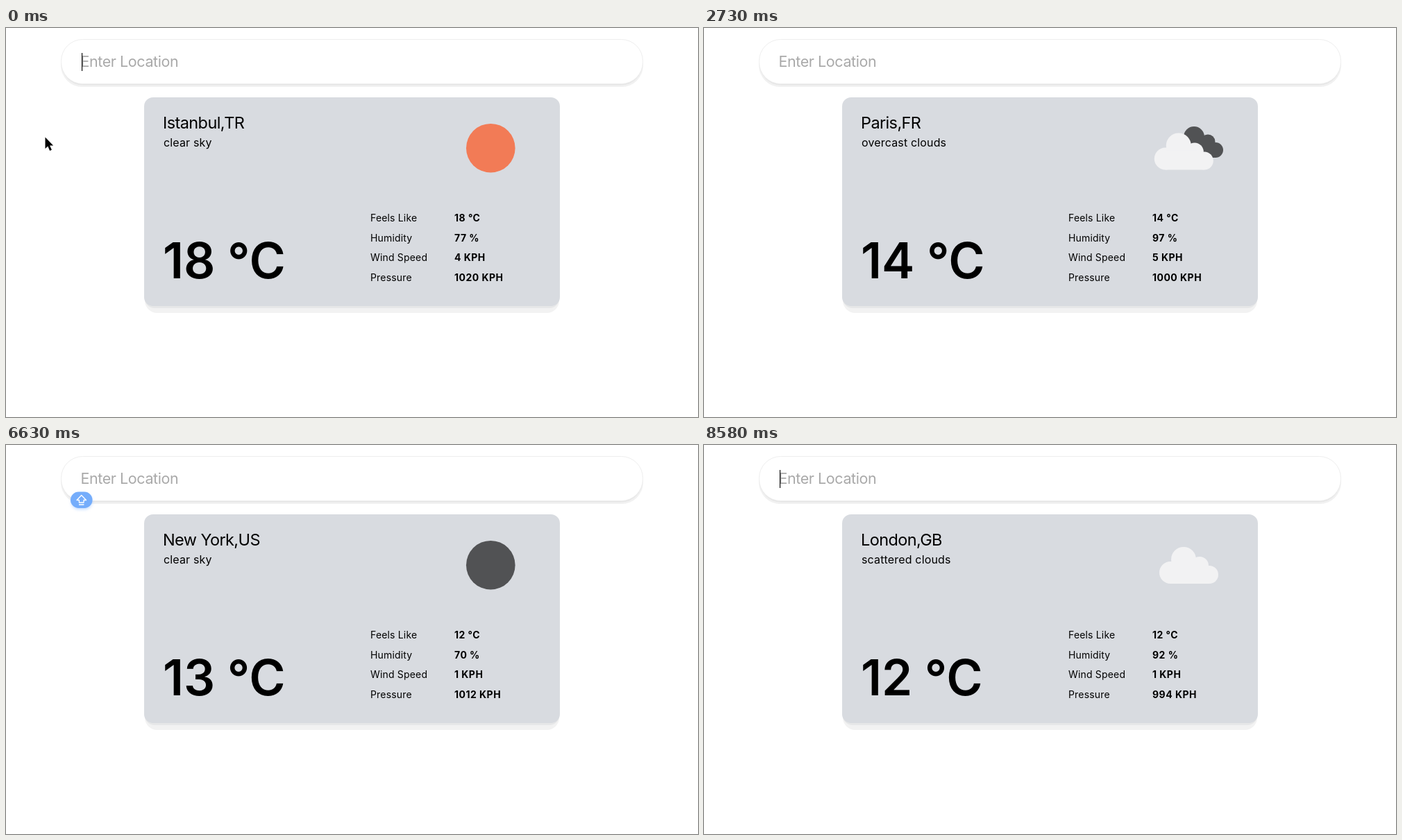
Animation of 997x561 px, one loop 8790 ms. Source, as an HTML page:

```html
<!DOCTYPE html>
<html lang="en">
<head>
<meta charset="utf-8">
<title>Weather</title>
<style>
html, body { margin: 0; width: 100%; height: 100%; overflow: hidden; background: #fff; }
svg { display: block; font-family: Inter, sans-serif; font-optical-sizing: none; }
text { white-space: pre; }
#field { font-size: 21.5px; letter-spacing: -.42px; }
#city { font-size: 23.5px; letter-spacing: -.6px; }
#sky { font-size: 16px; letter-spacing: .16px; }
#temp { font-size: 71px; font-weight: 600; letter-spacing: -.1px; }
.row { font-size: 14px; letter-spacing: .17px; }
.value { font-weight: 700; letter-spacing: .48px; }
</style>
</head>
<body>
<svg width="997" height="561" viewBox="0 0 997 561">
  <defs>
    <g id="cloud">
      <circle cx="672" cy="184" r="16"/><circle cx="691" cy="165" r="18"/>
      <circle cx="714" cy="174" r="13"/><circle cx="728" cy="187" r="13"/>
      <path d="M672 172H718L728 200H672Z"/>
    </g>
    <filter id="soft" x="-50%" y="-50%" width="200%" height="200%"><feGaussianBlur stdDeviation="2"/></filter>
  </defs>

  <rect x="79" y="20" width="839" height="65" rx="31" fill="#f1f1f1"/>
  <rect x="80" y="18" width="837" height="64.5" rx="31" fill="#e6e6e6"/>
  <rect x="79.5" y="16.5" width="838" height="64" rx="31" fill="#fff" stroke="#eee"/>

  <rect x="200" y="130" width="597" height="281" rx="18" fill="#f2f2f2"/>
  <rect x="200" y="130" width="597" height="274" rx="14" fill="#e6e7e8"/>
  <rect x="199" y="100" width="599" height="301" rx="13" fill="#d8dbe0"/>

  <text id="field" x="107.5" y="56.3"></text>
  <rect id="caret" y="36" width="1.1" height="26"/>

  <text id="city" x="226" y="145"></text>
  <text id="sky" x="227" y="171.3"></text>
  <text id="temp" x="226" y="361"></text>
  <g id="rows"></g>

  <circle id="disc" cx="698.3" cy="173.2" r="35.3"/>
  <g id="overcast">
    <g fill="#515254">
      <circle cx="706" cy="157" r="15"/><circle cx="726" cy="164" r="10.5"/>
      <circle cx="737" cy="176" r="11"/><path d="M700 158H726L738 187H710Z"/>
    </g>
    <use href="#cloud" x="-7.2" y="4.5" fill="#f2f2f3"/>
  </g>
  <use id="scattered" href="#cloud" fill="#f2f2f3"/>

  <g id="badge">
    <rect x="94" y="70" width="30" height="23" rx="11" fill="#8fbcff" opacity=".5" filter="url(#soft)"/>
    <rect x="93" y="67.5" width="31.5" height="23.5" rx="11.7" fill="#75adfb"/>
    <path d="M108.7 72.5L115.5 79.5H112V83H105.4V79.5H102Z M105 86H112.4" fill="none" stroke="#fff" stroke-width="1.3" stroke-linejoin="round"/>
  </g>
  <path id="mouse" d="M0 0V16.5L3.8 13L6.6 19.4L9.4 18.2L6.6 12H11.6Z" stroke="#fff" stroke-width="1.2" paint-order="stroke"/>
</svg>
<script>
const LOOP = 8790;
const $ = id => document.getElementById(id);
const show = (id, on) => $(id).style.display = on ? "" : "none";
const within = (t, spans) => spans.some(([a, b]) => t >= a && t < b);

// feels like, humidity, wind speed, pressure
const reports = [
  { at: 0, city: "Istanbul,TR", sky: "clear sky", temp: 18, values: [18, 77, 4, 1020] },
  { at: 2700, city: "Paris,FR", sky: "overcast clouds", temp: 14, values: [14, 97, 5, 1000] },
  { at: 5250, city: "New York,US", sky: "clear sky", temp: 13, values: [12, 70, 1, 1012] },
  { at: 8160, city: "London,GB", sky: "scattered clouds", temp: 12, values: [12, 92, 1, 994] }
];
const icons = [[0, "sun"], [2700, "overcast"], [5250, "moon"], [8400, "scattered"]];
const entries = [
  { word: "Paris", keys: [1200, 1470, 1800, 2010, 2100], clear: 2310 },
  { word: "New York", keys: [...Array(8)].map((_, i) => 4080 + i * 270 / 7), clear: 5010 },
  { word: "London", keys: [6750, 7020, 7200, 7350, 7530, 7680], clear: 7950 }
];
const caretOn = [[0, 120], [570, 1020], [1200, 2460], [2910, 3360], [3810, 4530],
  [4980, 5430], [5880, 6330], [6750, 8130], [8580, LOOP]];
const badgeOn = [[1110, 1200], [6630, 6750]];

const units = ["°C", "%", "KPH", "KPH"];
$("rows").innerHTML = ["Feels Like", "Humidity", "Wind Speed", "Pressure"].map((label, i) => {
  const y = 278.8 + i * 28.8;
  return `<text class="row" x="525" y="${y}">${label}</text><text class="row value" x="646" y="${y}"></text>`;
}).join("");
const cells = document.querySelectorAll(".value");

function drawField(t) {
  const entry = entries.find(e => t >= e.keys[0] && t < e.clear);
  const typed = entry ? entry.word.slice(0, entry.keys.filter(k => t >= k).length) : "";
  const field = $("field");
  field.textContent = typed || "Enter Location";
  field.setAttribute("fill", typed ? "#555" : "#a9a9a9");
  $("caret").setAttribute("x", typed ? 108.5 + field.getComputedTextLength() : 109);
  show("caret", within(t, caretOn));
  show("badge", within(t, badgeOn));
}

function drawCard(t) {
  const r = reports.findLast(r => t >= r.at);
  const icon = icons.findLast(([at]) => t >= at)[1];
  $("city").textContent = r.city;
  $("sky").textContent = r.sky;
  $("temp").textContent = r.temp + " °C";
  cells.forEach((c, i) => c.textContent = r.values[i] + " " + units[i]);
  show("disc", icon === "sun" || icon === "moon");
  $("disc").setAttribute("fill", icon === "sun" ? "#f27b56" : "#515254");
  show("overcast", icon === "overcast");
  show("scattered", icon === "scattered");
}

function drawMouse(t) {
  const p = Math.min(1, Math.max(0, t / 600));
  const e = p * p * (3 - 2 * p);
  $("mouse").setAttribute("transform", `translate(${56.5 + 67 * e} ${157.5 - 29 * e})`);
  show("mouse", t < 1200);
}

const start = performance.now();
function frame() {
  const t = (performance.now() - start) % LOOP;
  drawField(t);
  drawCard(t);
  drawMouse(t);
  requestAnimationFrame(frame);
}
frame();
</script>
</body>
</html>
```
